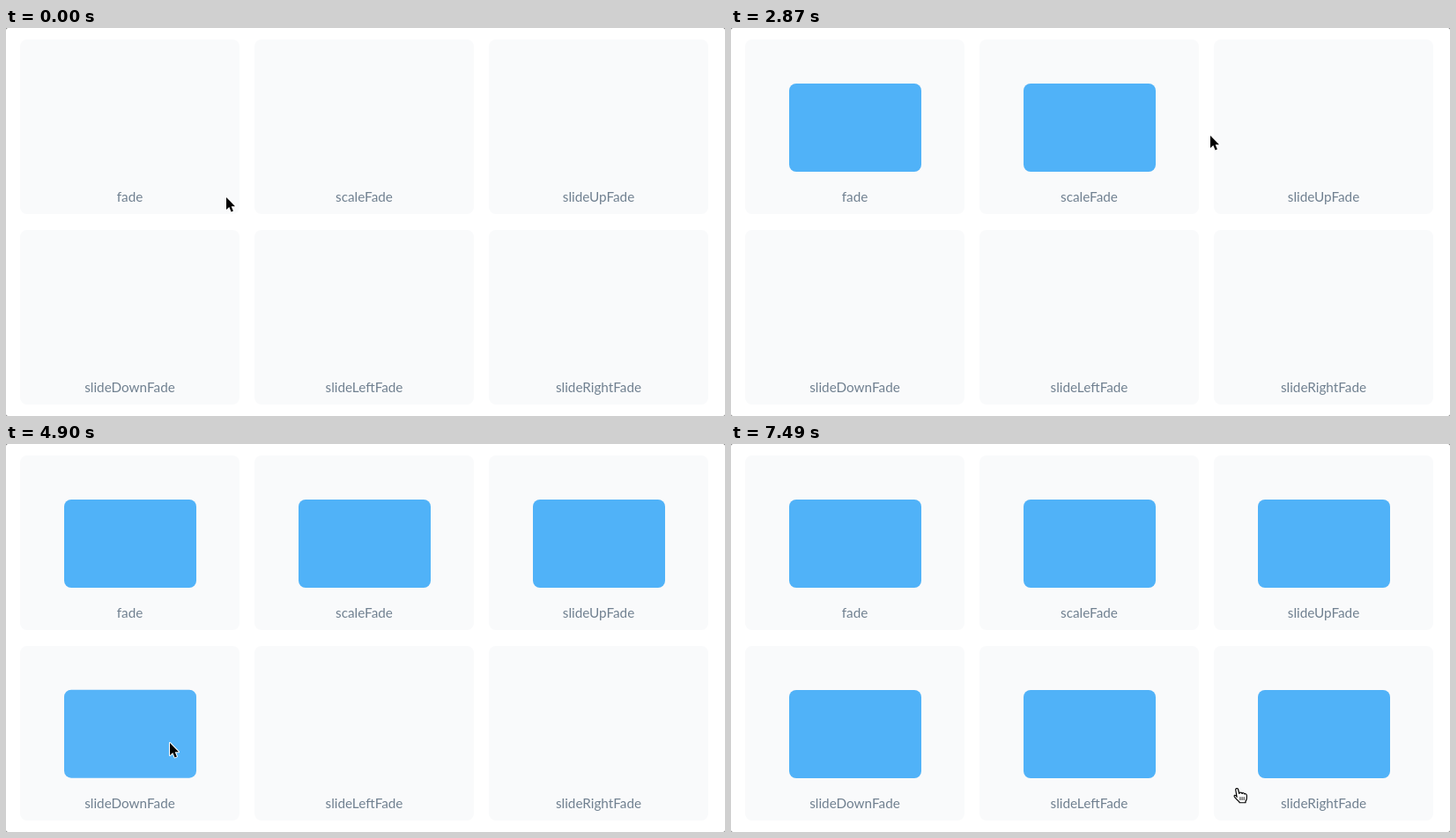
Write an HTML page that moves like this. It is 816 by 440 pixels and loops after 7560 ms.

```html
<!DOCTYPE html>
<html lang="en">
<head>
<meta charset="utf-8">
<title>Entrance transitions</title>
<style>
html, body { margin: 0; width: 100%; height: 100%; overflow: hidden; background: #fff; }
svg { display: block; width: 816px; height: 440px; background: #777; }
text { font: 15.3px Lato, "Open Sans", sans-serif; fill: #708090; text-anchor: middle; }
</style>
</head>
<body>
<svg id="stage" viewBox="0 0 816 440">
  <rect width="816" height="440" rx="2.5" fill="#fff"/>
  <g id="cards"></g>
  <g id="cursor">
    <path id="arrow" d="M0 0V14L3.3 11L5.6 16.4L7.9 15.4L5.7 10.2H10Z"
      fill="#000" stroke="#fff" stroke-width="2" stroke-linejoin="round" paint-order="stroke"/>
    <g id="hand" transform="translate(-.4 0) scale(1.08)" stroke="#000" stroke-linejoin="round" stroke-linecap="round">
      <path d="M-.9 9.6L-2.2 2.1A1.35 1.35 0 0 1 .4 1.4L1.6 6Q1.8 4.8 3 4.8Q4.2 4.8 4.6 6Q4.9 5.2 5.9 5.3Q6.9 5.4 7.2 6.5Q7.6 5.9 8.4 6.2Q9.4 6.6 9.5 8.1L9.4 11Q9.3 12.6 8.2 14.2V15.5H1.9L1.6 14.5Q-.6 12.8-3.3 9.6Q-4.1 8.2-3.2 7.7Q-2 7.3-.9 9.6Z"
        fill="#fff" stroke-width="1.1"/>
      <path d="M2.6 9.8V12.6M4.6 9.8V12.6M6.6 9.8V12.6" fill="none" stroke-width=".8"/>
    </g>
  </g>
</svg>
<script>
const LOOP = 7560, STEP = 70, FADE = 231;
const CARD = { w: 249, h: 198 }, BOX = { w: 150, h: 100 }, PITCH = { x: 266, y: 216 };
const $ = id => document.getElementById(id);

function add(tag, attrs) {
  const el = document.createElementNS("http://www.w3.org/2000/svg", tag);
  for (const k in attrs) el.setAttribute(k, attrs[k]);
  return $("cards").appendChild(el);
}

// rest: where the pointer clicks; travel: time it takes to get there;
// dx, dy, s: the box's starting offset and scale
const cards = [
  { name: "fade", start: 700, travel: 560, rest: [185, 153] },
  { name: "scaleFade", start: 2030, travel: 630, rest: [471, 147], s: 0.85 },
  { name: "slideUpFade", start: 3360, travel: 630, rest: [690, 144], dy: 10 },
  { name: "slideDownFade", start: 4760, travel: 700, rest: [186, 339], dy: -10 },
  { name: "slideLeftFade", start: 6090, travel: 630, rest: [434, 341], dx: 10 },
  { name: "slideRightFade", start: 7140, travel: 420, rest: [660, 343], dx: -10 }
];

cards.forEach((c, i) => {
  c.x = 16 + PITCH.x * (i % 3);
  c.y = 13 + PITCH.y * Math.floor(i / 3);
  c.cx = c.x + 125;
  c.cy = c.y + 100;
  add("rect", { x: c.x, y: c.y, width: CARD.w, height: CARD.h, rx: 8, fill: "#f9fafb" });
  c.box = add("rect", { x: -BOX.w / 2, y: -BOX.h / 2, width: BOX.w, height: BOX.h, rx: 8, fill: "#50b2f8" });
  add("text", { x: c.cx - 0.5, y: c.y + 184 }).textContent = c.name;
});

// One trip to each card, then off towards the lower left
const trips = cards.map(c => ({ end: c.start - STEP, time: c.travel, to: c.rest }));
trips.push({ end: LOOP - STEP, time: 2 * STEP, to: [575.5, 390] });

const clamp = v => Math.max(0, Math.min(1, v));

// Runs about 5% past the end and settles back
const overshoot = u => u * u * (4 - 3 * u);

// cubic-bezier(.25, .1, .25, 1)
function ease(x) {
  const bez = (a, b, u) => 3 * a * u * (1 - u) ** 2 + 3 * b * u * u * (1 - u) + u ** 3;
  let lo = 0, hi = 1;
  for (let i = 0; i < 20; i++) {
    const mid = (lo + hi) / 2;
    if (bez(0.25, 0.25, mid) < x) lo = mid; else hi = mid;
  }
  return x >= 1 ? 1 : bez(0.1, 1, lo);
}

// Sideways trips arc upwards in proportion to their length
function pointer(t) {
  let x = 250, y = 192;
  for (const { end, time, to } of trips) {
    const v = overshoot(clamp((t - end + time) / time));
    const dx = to[0] - x, dy = to[1] - y;
    const lift = (Math.abs(dx) - Math.abs(dy)) / 8;
    x += dx * v;
    y += dy * v - 4 * v * (1 - v) * lift;
    if (t < end) break;
  }
  return [x, y];
}

function draw(t) {
  const [x, y] = pointer(t);
  const over = (c, w, h) => Math.abs(x - c.cx) < w / 2 && Math.abs(y - c.cy) < h / 2;
  let hand = false;
  for (const c of cards) {
    const p = t < c.start ? 0 : ease(clamp((t - c.start + STEP / 2) / FADE));
    const q = 1 - p, { dx = 0, dy = 0, s = 1 } = c;
    c.box.setAttribute("opacity", p);
    c.box.setAttribute("transform",
      `translate(${c.cx + dx * q} ${c.cy + dy * q}) scale(${1 - (1 - s) * q})`);
    const covered = p > 0.5 && over(c, BOX.w, BOX.h);
    if (t > 0 && over(c, CARD.w, CARD.h) && !covered) hand = true;
  }
  $("cursor").setAttribute("transform", `translate(${x.toFixed(1)} ${y.toFixed(1)})`);
  $("hand").style.display = hand ? "" : "none";
  $("arrow").style.display = hand ? "none" : "";
}

const begin = performance.now();
function tick() {
  const t = (performance.now() - begin) % LOOP;
  draw(Math.floor(t / STEP) * STEP);
  requestAnimationFrame(tick);
}
tick();
</script>
</body>
</html>
```
